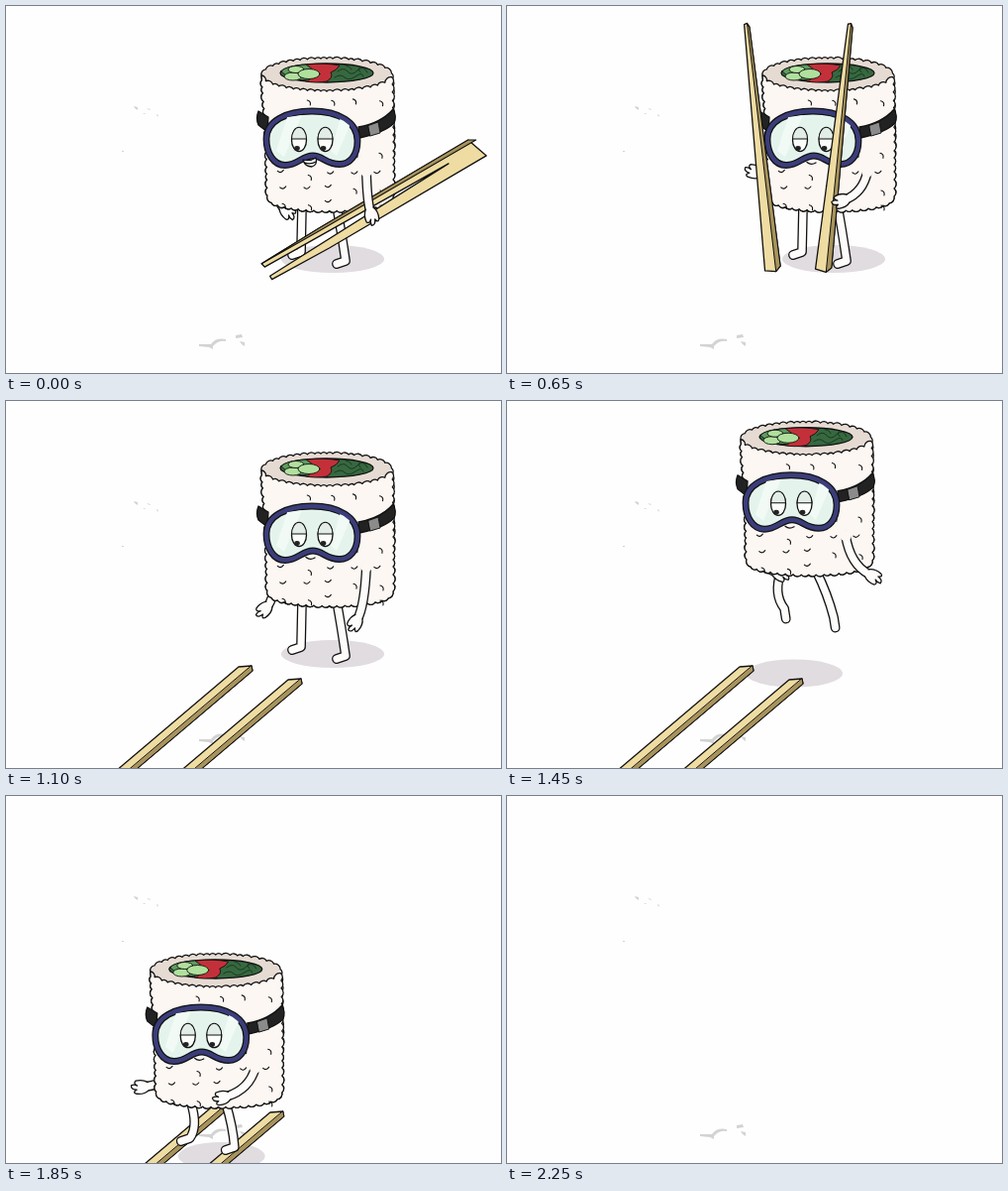
Recreate the animation shown at these times as an HTML page. Size 500 by 370 pixels, loop 2300 ms.

```html
<!DOCTYPE html>
<html lang="en">
<head>
<meta charset="utf-8">
<title>Sushi on skis</title>
<style>
html, body { margin: 0; width: 100%; height: 100%; overflow: hidden; background: #fefefe; }
svg { display: block; width: 100vw; height: 100vh; }
</style>
</head>
<body>
<svg viewBox="0 0 500 370" fill="none" stroke="#111" stroke-width="1.3" stroke-linejoin="round" stroke-linecap="round">
  <g fill="#d3d3d3" stroke="none">
    <path d="M129 101l4 1v3l-3-2zM142 103l4 1-1 1zM138 108l3 0-1 1zM152 109l2 1-1 2zM117 146h2v1h-2z"/>
    <path d="M195 341L207 341Q212 334 222 336L222 338Q214 337 209 343L209 346L205 344L195 343zM232 332L238 331L239 334L232 335zM236 338L241 339L241 343L238 341z"/>
  </g>
  <ellipse id="shadow" ry="14" fill="#e0dce0" stroke="none"/>
  <g id="skis"></g>
  <g class="rider" id="back"></g>
  <g class="rider" id="body"></g>
  <g id="sticks"></g>
  <g class="rider" id="front"></g>
</svg>
<script>
const LOOP = 2300, STEP = 50;
const RICE = '#fcf7f3', LIMB = '#fefcfa', LIGHT = '#eedca2', DARK = '#a8935c';
const $ = id => document.getElementById(id);
const path = (d, attrs = '') => `<path d="${d}" ${attrs}/>`;
const oval = (x, y, rx, ry, attrs = '') => `<ellipse cx="${x}" cy="${y}" rx="${rx}" ry="${ry}" ${attrs}/>`;
const place = (x, y, a, inner) => `<g transform="translate(${x} ${y}) rotate(${a})">${inner}</g>`;

const mix = (a, b, k) => a + (b - a) * k;
const span = (t, a, b) => Math.min(1, Math.max(0, (t - a) / (b - a)));
const rand = i => { const v = Math.sin(i * 12.9898) * 43758.5453; return v - Math.floor(v); };

// Position at time t along key points [time, x, y]
function along(keys, t) {
  const i = Math.max(1, keys.findIndex(k => k[0] >= t));
  const [a, b] = t >= keys[keys.length - 1][0] ? keys.slice(-2) : [keys[i - 1], keys[i]];
  const k = span(t, a[0], b[0]);
  return [mix(a[1], b[1], k), mix(a[2], b[2], k)];
}

// ---------- body ----------
function arc(cx, cy, rx, ry, from, to) {
  return Array.from({ length: 121 }, (_, i) => {
    const a = mix(from, to, i / 120) * Math.PI;
    return [cx + rx * Math.cos(a), cy + ry * Math.sin(a)];
  });
}
// Walks an outline and turns it into a chain of rice grains
function scallop(pts) {
  const dense = pts.flatMap((p, i) => {
    const q = pts[(i + 1) % pts.length], n = Math.ceil(Math.hypot(q[0] - p[0], q[1] - p[1]));
    return Array.from({ length: n }, (_, j) => [mix(p[0], q[0], j / n), mix(p[1], q[1], j / n)]);
  });
  let last = dense[0], want = 7, d = `M${last}`;
  dense.forEach((p, i) => {
    const c = Math.hypot(p[0] - last[0], p[1] - last[1]);
    if (c < want) return;
    d += `A${c * 0.66} ${c * 0.66} 0 0 1 ${p}`;
    last = p;
    want = 5.5 + 3 * rand(i);
  });
  return d + 'Z';
}

function bodyMarkup() {
  const sides = [[390, 72], [391, 130], ...arc(327.5, 194, 63.5, 12.5, 0, 1), [263, 130], [258, 70]];
  const top = arc(324, 70, 66, 17, 1, 2), rim = arc(324, 70, 66, 16, 1, 0);
  let grains = '';
  for (const y of [93, 146, 168, 183, 198])
    for (let x = 272; x < 388; x += 24) {
      const r = rand(x + y);
      if (r > 0.2) grains += `M${x + r * 10} ${y + r * 6 - 3}` + (r > 0.6 ? 'q4 1 3 5' : 'q3 3 6-1');
    }
  const lens = 'M263 134C263 116 283 106 309 106C336 106 355 117 355 136' +
    'C355 151 347 159.500 337 159.500C323 159.500 320 151 310 151C299 151 295 160.500 282 160.500C270 160.500 263 148 263 134Z';
  const eye = x =>
    oval(x, 135, 7.5, 11.7, 'fill="#fbfdfb"') +
    path(`M${x - 7.5} 134A7.500 11.700 0 0 1 ${x + 7.5} 134Z`, 'fill="#e3ede7" stroke-width="1.100"') +
    oval(x - 2, 143.5, 2.8, 2.4, 'fill="#222" stroke="none"');
  const thin = 'stroke-width="0.900"';

  return path(scallop([...top, ...sides]), 'fill="#e6dbd3"') +
    path(scallop([...rim, ...sides]), `fill="${RICE}"`) +
    path(grains, 'stroke-width="1.100"') +
    oval(324, 67.5, 47, 9.5, 'fill="#37683f"') +
    path('M304 59Q322 57 337 60Q334 65 328 67Q331 72 324 76Q312 78 303 76Z', `fill="#c4303a" ${thin}`) +
    path('M278 66Q282 60 303 59L310 64L306 75Q286 75 278 66Z', `fill="#5e9c60" ${thin}`) +
    [[290, 71, 9, 4], [293, 64, 8, 3.5], [306, 68.5, 11, 5]].map(e => oval(...e, `fill="#b0e09d" ${thin}`)).join('') +
    path('M335 66q6-5 10 0t10-1 10 2M332 72q6-4 10 0t11-1 8 0M343 60q5 1 6 4M357 62q-2 3 1 5', 'stroke="#15331e" stroke-width="0.900"') +
    path('M265 112L255 106Q252 113 255 120L264 127Z', 'fill="#222"') +
    path('M356 122Q379 118 391 104Q395 111 392 118Q382 128 357 133Z', 'fill="#222"') +
    path('M366 120.500L376 117L378 128L368 131Z', `fill="#8b8b8b" ${thin}`) +
    path(lens, 'fill="#e4f4ec" stroke-width="6.800"') +
    path('M284 112L273 146L281 152L299 110ZM338 112L328 146L334 151L348 119Z', 'fill="#f2faf6" stroke="none"') +
    path(lens, 'stroke="#3b3d7a" stroke-width="4.300"') +
    eye(296) + eye(322.5) + '<g id="mouth"></g>';
}
const OPEN_MOUTH = path('M300 155Q307 157 313 153Q315 160 309 162Q302 162 300 155ZM302 158Q308 160 313 157', 'fill="#fff"');
const SMILE = path('M303 157.500Q307 161 312 158');

// ---------- limbs ----------
const limb = (d, w) => path(d, `stroke-width="${w}"`) + path(d, `stroke="${LIMB}" stroke-width="${w - 2.6}"`);

function arm([sx, sy], [wx, wy]) {
  const ex = mix(sx, wx, 0.2), ey = mix(sy, wy, 0.75);
  const a = Math.atan2(wy - ey, wx - ex) * 180 / Math.PI;
  return limb(`M${sx} ${sy}Q${ex} ${ey} ${wx} ${wy}`, 10) +
    oval(sx, sy, 5.8, 5.8, `fill="${RICE}" stroke="none"`) +
    place(wx, wy, a, path('M-3-4Q2-8 10-6Q14-4 9-2Q15-1 14 3Q11 4 8 2Q12 5 9 7Q2 8-3 4', `fill="${LIMB}"`));
}
// The foot points left on the ground and hangs down in the air
function leg(hip, footX, footY, bend, air) {
  const ax = footX + mix(9, -4, air), ay = footY - mix(3, 12, air);
  return limb(`M${hip} 202Q${mix(hip, ax, 0.5) + bend} 226 ${ax} ${ay}L${footX} ${footY}`, 9.8);
}

// ---------- chopsticks ----------
const pair = (x, y, a) => place(x, y, a,
  path('M-4-11.500L180-11.500L246-9.500L246-5.500L33 1L246 5L247 9.500L180 11L4 11.500Z', `fill="${LIGHT}"`) +
  path('M4 11.500L180 11L247 9.500L180 8.500L-3 7.500Z', `fill="${DARK}" stroke-width="1"`));

const stick = (x, y, a) => place(x, y, a,
  path('M0-8L249-2L250 1L246 3L3 8L-2 3Z', `fill="${LIGHT}"`) +
  path('M-2 3L249 1L246 3L3 8Z', `fill="${DARK}" stroke-width="1"`));

const ski = (x, y) => place(x, y, 0,
  path('M0 0L13-1L14 4L-180 168L-189 160Z', `fill="${LIGHT}"`) +
  path('M13-1L14 4L-180 168L-183 165Z', `fill="${DARK}" stroke-width="1"`));

// Swing the joined pair upright
function swing(t) {
  const k = span(t, 100, 350);
  return pair(mix(476, 292, k ** 1.73), mix(143, 267, 1 - (1 - k) ** 3), mix(149.6, 270, k ** 1.28));
}
// Pull one stick aside, carry it to its place and let it fall
function drop(t, side, x, y) {
  const pull = span(t, 500, 650), carry = span(t, 680, 880), fall = span(t, 900, 1100) ** 2;
  const lift = 10 * Math.sin(Math.PI * span(t, 650, 850));
  const spread = mix(mix(0, 6.2 * side, pull), -6, carry);
  return stick(mix(294 + side * mix(6, 25.5, pull), x, carry), mix(266, y, carry) - lift, mix(270 + spread, 140, fall));
}

// ---------- motion ----------
const RIGHT_HAND = [[100, 368, 207], [300, 313, 187], [500, 311, 189], [650, 342, 195], [900, 310, 196],
  [1000, 315, 202], [1100, 355, 220], [1300, 402, 198], [1450, 388, 206], [1550, 406, 194], [1750, 335, 196]];
const LEFT_HAND = [[100, 281, 204], [300, 257, 168], [500, 276, 168], [650, 254, 168], [900, 246, 174],
  [1100, 264, 207], [1300, 250, 198], [1450, 294, 204], [1550, 250, 194], [1750, 253, 186]];

function render(t) {
  const run = Math.max(0, t - 1700);
  const sy = run * 0.1728 + run * run * 0.000537, sx = -sy * 0.48;
  const crouch = 10 * span(t, 1150, 1250);
  const jump = span(t, 1350, 1700), air = 4 * jump * (1 - jump);
  const x = -94 * jump ** 1.16 + sx, y = crouch + 59 * jump - 71.2 * air + sy;
  document.querySelectorAll('.rider').forEach(g => g.setAttribute('transform', `translate(${x} ${y})`));

  const glide = span(t, 1300, 1700);
  const shadow = { cx: mix(330, 236, glide ** 0.87) + sx, cy: mix(255, 325, glide ** 1.3) + sy, rx: mix(52, 44, glide) };
  for (const k in shadow) $('shadow').setAttribute(k, shadow[k]);

  $('skis').innerHTML = t < 1100 ? '' : ski(235 + sx, 268 + sy) + ski(285 + sx, 281 + sy);
  $('sticks').innerHTML = t < 550 ? swing(t)
    : t < 1100 ? drop(t, -1, 244, 272) + drop(t, 1, 293, 282) : '';
  const footLift = crouch - 12 * air;
  $('back').innerHTML = leg(299, 289 + 18 * air, 251 - footLift, crouch * 0.8 - 22 * air, air) +
    leg(334, 334 + 24 * air, 260 - footLift, crouch * 0.3, air) +
    arm([272, 178], along(LEFT_HAND, t));
  $('front').innerHTML = arm([364, 167], along(RIGHT_HAND, t));
  $('mouth').innerHTML = t < 150 ? OPEN_MOUTH : SMILE;
}

$('body').innerHTML = bodyMarkup();
const start = performance.now();
let last = -1;
function tick() {
  const t = Math.floor(((performance.now() - start) % LOOP) / STEP) * STEP;
  if (t !== last) render(last = t);
  requestAnimationFrame(tick);
}
tick();
</script>
</body>
</html>
```
